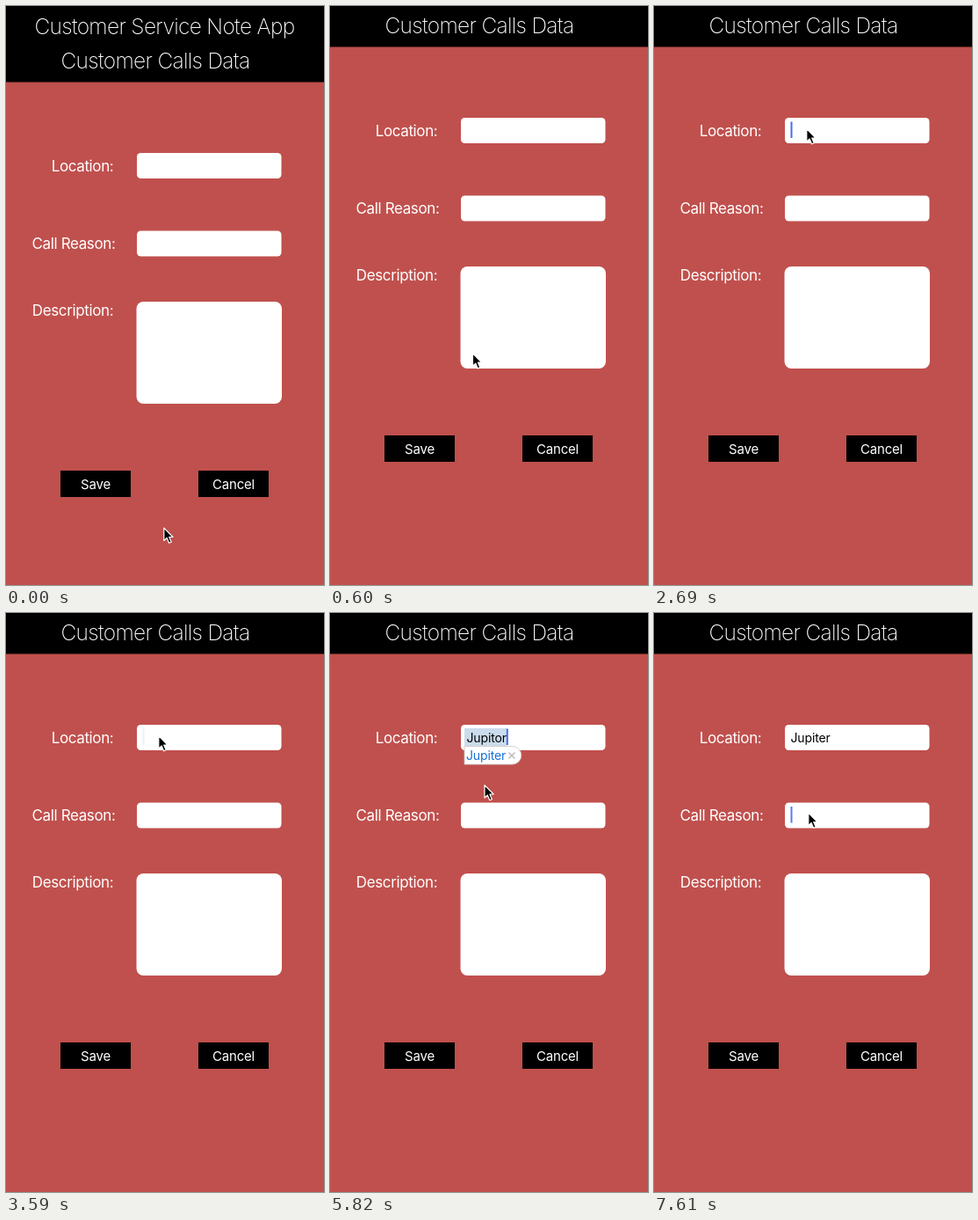
These frames come from a looping animation (362 by 658 pixels, 8 s). An HTML page:

```html
<!DOCTYPE html>
<html lang="en">
<head>
<meta charset="utf-8">
<title>Call note form</title>
<style>
html, body { margin: 0; width: 100%; height: 100%; overflow: hidden; background: #c0504d; }
svg { display: block; width: 362px; height: 658px; }
text { font-family: Inter, "Open Sans", sans-serif; }
.title { font-size: 24.5px; font-weight: 150; letter-spacing: -.68px; fill: #fff; text-anchor: middle; }
.label { font-size: 17px; letter-spacing: -.37px; fill: #fff; text-anchor: middle; }
.button { font-size: 15px; letter-spacing: -.2px; fill: #fff; text-anchor: middle; }
.value { font-size: 14px; letter-spacing: -.15px; }
</style>
</head>
<body>
<svg viewBox="0 0 362 658">
  <rect width="362" height="658" fill="#c0504d"/>
  <g id="page">
    <rect y="-60" width="362" height="106.5"/>
    <text class="title" x="180.5" y="-8">Customer Service Note App</text>
    <text class="title" x="170" y="31">Customer Calls Data</text>
    <text class="label" x="87" y="148">Location:</text>
    <text class="label" x="77" y="236">Call Reason:</text>
    <text class="label" x="76" y="312">Description:</text>
    <g fill="#fff">
      <rect x="149" y="127" width="164.5" height="29" rx="4.5"/>
      <rect x="149" y="215.5" width="164.5" height="29" rx="4.5"/>
      <rect x="148.5" y="296" width="165.5" height="116" rx="8"/>
    </g>
    <rect x="62" y="488" width="80" height="30"/>
    <rect x="219" y="488" width="80" height="30"/>
    <text class="button" x="102" y="508.5">Save</text>
    <text class="button" x="259" y="508.5">Cancel</text>
  </g>
  <rect id="mark" x="153" y="131" width="48" height="20" fill="#cbdcec"/>
  <text id="typed" class="value" x="155.5" y="146.5"></text>
  <g id="hint">
    <path d="M153 151.5H207.5a10.3 10.3 0 0 1 0 20.6H153z" fill="#fff" stroke="#c9c3c3" stroke-width=".8"/>
    <text class="value" x="155" y="167" fill="#176fd6">Jupiter</text>
    <path d="M203.5 158.5l7 7m0-7l-7 7" stroke="#b4b4b4" stroke-width="1.2"/>
  </g>
  <rect id="caret" width="2" height="18.5" fill="#4770e6"/>
  <path id="pointer" d="M.8 1.2V15.6L4.1 12.5 6.6 18.3 9.2 17.2 6.7 11.5H11z"
    stroke="#fff" stroke-width="1.2" stroke-linejoin="round"/>
</svg>
<script>
const [page, mark, typed, hint, caret, pointer] =
  ["page", "mark", "typed", "hint", "caret", "pointer"].map(id => document.getElementById(id));

const LOOP = 8000, TICK = 149.3;

// Moments below are counted in ticks.
const FOCUS = 11, HINT = 37, ACCEPT = 45;
const keys = [25, 26, 28, 31, 34, 35, 36];

const clamp = v => Math.min(1, Math.max(0, v));
const place = (el, x, y) => el.setAttribute("transform", `translate(${x} ${y})`);
const fade = (el, alpha) => el.setAttribute("opacity", alpha);

// Decelerating path from a to b, bent sideways by bow pixels.
function glide(a, b, bow, u) {
  const k = 1 - (1 - clamp(u)) ** 2;
  return [a[0] + (b[0] - a[0]) * k + bow * Math.sin(Math.PI * k), a[1] + (b[1] - a[1]) * k];
}

// Solid until age 0, then quick fade-in, slower fade-out and a pause.
function blink(age) {
  if (age < 0) return 1;
  const p = age % 6.6;
  return clamp(Math.min(.1 + 4 * p, (4.5 - p) * .8));
}

function pointerAt(n) {
  const rest = [179, 592], first = [173, 138.5], second = [175, 226];
  return n < HINT
    ? glide(rest, first, -15, (n - 3) / 4)
    : glide(first, second, 1, (n - HINT) / 5);
}

function caretLevel(n) {
  if (n < FOCUS) return 0;
  const since = n < keys[0] ? 10.8 : n < ACCEPT ? 38.1 : 44.2;
  return blink(n - since);
}

function draw(t) {
  const n = Math.floor(t / TICK + .07);
  const accepted = n >= ACCEPT;
  const hinting = n >= HINT && !accepted ? 1 : 0;

  place(page, 0, Math.round(40 * .1 ** n));
  place(pointer, ...pointerAt(n));
  fade(hint, hinting);
  fade(mark, hinting);

  const count = keys.filter(k => k <= n).length;
  typed.textContent = accepted ? "Jupiter" : "Jupitor".slice(0, count);

  const advance = count && !accepted ? typed.getComputedTextLength() : 0;
  place(caret, 155.5 + advance, accepted ? 220 : 131.5);
  fade(caret, caretLevel(n));
}

const start = performance.now();
function tick() {
  draw((performance.now() - start) % LOOP);
  requestAnimationFrame(tick);
}
tick();
</script>
</body>
</html>
```
